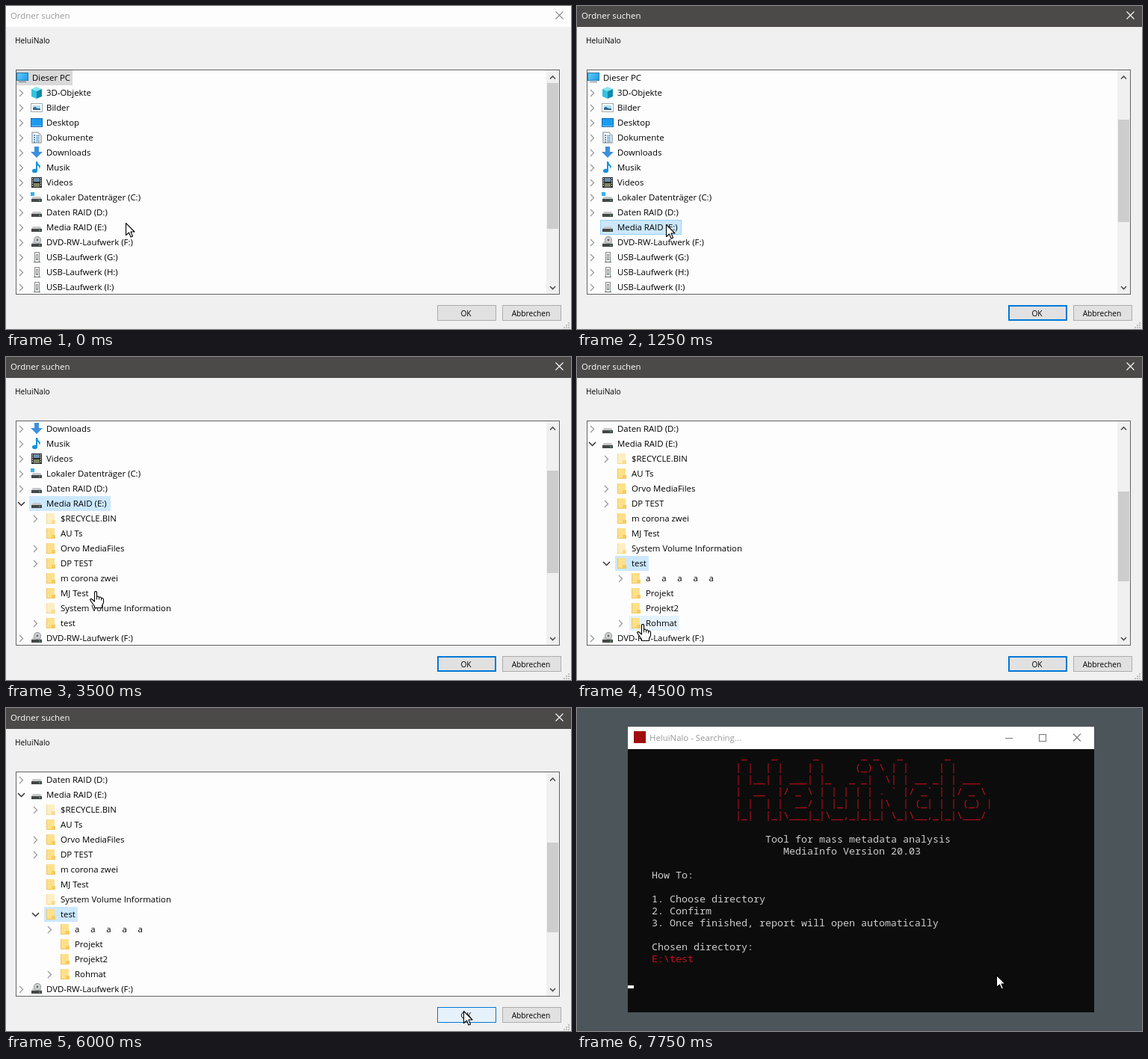
Animation, 756 px wide and 432 px high, one loop 8 s. Source, as an HTML page with a canvas:

```html
<!DOCTYPE html>
<html lang="de">
<head>
<meta charset="utf-8">
<title>HeluiNalo</title>
<style>
html, body { margin: 0; width: 100%; height: 100%; overflow: hidden; background: #f0f0f0; }
canvas { display: block; width: 756px; height: 432px; }
</style>
</head>
<body>
<canvas id="stage" width="756" height="432"></canvas>
<script>
const ctx = document.getElementById('stage').getContext('2d');
const LOOP = 8000;
const APP = 'HeluiNalo';
const UI = '11.4px "Open Sans", "Noto Sans", sans-serif';
const SMALL = '10.2px "Open Sans", "Noto Sans", sans-serif';
const MONO = '13.333px "Noto Sans Mono", "DejaVu Sans Mono", monospace';

// ---------- drawing helpers ----------
function box(x, y, w, h, fill) {
  ctx.fillStyle = fill;
  ctx.fillRect(x, y, w, h);
}
function frame(x, y, w, h, color, line = 1) {
  ctx.strokeStyle = color;
  ctx.lineWidth = line;
  ctx.strokeRect(x + line / 2, y + line / 2, w - line, h - line);
}
function path(points, close) {
  ctx.beginPath();
  for (let i = 0; i < points.length; i += 2) ctx.lineTo(points[i], points[i + 1]);
  if (close) ctx.closePath();
}
function poly(points, fill, stroke) {
  path(points, true);
  ctx.fillStyle = fill;
  ctx.fill();
  if (stroke) { ctx.strokeStyle = stroke; ctx.lineWidth = 1.1; ctx.stroke(); }
}
function line(points, color, width = 1) {
  path(points, false);
  ctx.strokeStyle = color;
  ctx.lineWidth = width;
  ctx.stroke();
}
function disc(x, y, rx, ry, fill) {
  ctx.beginPath();
  ctx.ellipse(x, y, rx, ry, 0, 0, 7);
  ctx.fillStyle = fill;
  ctx.fill();
}
function text(str, x, y, color = '#000', font = UI, align = 'left') {
  ctx.font = font;
  ctx.fillStyle = color;
  ctx.textAlign = align;
  ctx.fillText(str, x, y);
}
function cross(x, y, color) {
  line([x - 5, y - 5, x + 5, y + 5], color, 1.1);
  line([x + 5, y - 5, x - 5, y + 5], color, 1.1);
}

// ---------- icons, each in a 16 by 16 cell ----------
function drive() {
  poly([3, 7, 13, 7, 15, 10, 1, 10], '#c6c8ca');
  box(1, 10, 14, 4, '#444648');
  box(11, 11.5, 2, 1, '#4fd66a');
}
const icons = {
  pc() {
    box(0, 1, 16, 11, '#2878a8');
    const g = ctx.createLinearGradient(0, 2, 16, 11);
    g.addColorStop(0, '#66cdf8');
    g.addColorStop(1, '#1d9be6');
    box(1, 2, 14, 9, g);
    box(3, 13, 10, 1, '#5d7d90');
  },
  cube() {
    poly([8, 0, 15, 3, 8, 6, 1, 3], '#8ce4f2');
    poly([1, 3, 8, 6, 8, 16, 1, 13], '#35c3dc');
    poly([15, 3, 8, 6, 8, 16, 15, 13], '#0d8cae');
  },
  picture() {
    box(0, 2, 16, 12, '#a4a9ac');
    box(1, 3, 14, 10, '#fff');
    box(3, 5, 10, 6, '#a9dcf8');
    poly([3, 11, 3, 8, 6, 7, 9, 9, 13, 9, 13, 11], '#2d688e');
  },
  desktop() {
    box(0, 2, 16, 12, '#1468b0');
    box(1, 3, 14, 9, '#1c9cf0');
    box(1, 12, 14, 1, '#75c5f6');
  },
  page() {
    poly([2, 1, 10, 1, 14, 5, 14, 15, 2, 15], '#fff', '#80878c');
    poly([10, 1, 10, 5, 14, 5], '#d4dade');
    for (let y = 4; y < 14; y += 2) box(7, y + 1, 5, 1, '#4b8fbd');
    for (let y = 4; y < 14; y += 3) box(4, y, 2, 2, '#4b8fbd');
  },
  down() {
    poly([5, 0, 11, 0, 11, 7, 16, 7, 8, 15, 0, 7, 5, 7], '#3d8fdd');
  },
  music() {
    disc(5.5, 12.5, 3.5, 2.8, '#1592dc');
    box(7, 0, 2, 13, '#1592dc');
    poly([9, 0, 10, 3, 13, 6, 12, 10, 11, 7, 9, 5], '#1592dc');
  },
  film() {
    box(1, 1, 14, 14, '#2b2b2d');
    for (let y = 2; y < 14; y += 3) {
      box(2, y, 1, 2, '#ddd');
      box(13, y, 1, 2, '#ddd');
    }
    box(4, 2, 8, 5, '#6a8fae');
    box(4, 9, 8, 5, '#7c8760');
  },
  system() {
    drive();
    box(0, 1, 5, 5, '#35b0ee');
  },
  drive,
  dvd() {
    drive();
    disc(9, 5, 5, 5, '#8e9296');
    disc(9, 5, 4, 4, '#cfd2d4');
    disc(9, 5, 1.4, 1.4, '#666');
  },
  usb() {
    box(5, 1, 7, 14, '#85888a');
    box(6, 2, 5, 12, '#f6f6f6');
    box(7, 4, 3, 8, '#8d9092');
    box(8, 5, 1, 5, '#eee');
    box(8, 11, 1, 1, '#3fc45b');
    box(4, 14, 9, 1, '#696c6e');
  },
  folder() {
    box(2, 1, 11, 14, '#ffe08a');
    box(2, 1, 1, 14, '#edc765');
    box(2, 14, 11, 1, '#eec663');
    poly([9, 10, 14, 10, 14, 15, 9, 15], '#f6cb5f');
  },
  hidden() {
    ctx.globalAlpha = 0.5;
    icons.folder();
    ctx.globalAlpha = 1;
  }
};

// ---------- folder tree: level, icon, label, chevron ----------
const head = [
  [0, 'pc', 'Dieser PC', ''],
  [1, 'cube', '3D-Objekte', '>'],
  [1, 'picture', 'Bilder', '>'],
  [1, 'desktop', 'Desktop', '>'],
  [1, 'page', 'Dokumente', '>'],
  [1, 'down', 'Downloads', '>'],
  [1, 'music', 'Musik', '>'],
  [1, 'film', 'Videos', '>'],
  [1, 'system', 'Lokaler Datenträger (C:)', '>'],
  [1, 'drive', 'Daten RAID (D:)', '>']
];
const tail = [
  [1, 'dvd', 'DVD-RW-Laufwerk (F:)', '>'],
  ...['G', 'H', 'I'].map(c => [1, 'usb', `USB-Laufwerk (${c}:)`, '>'])
];
const media = chevron => [1, 'drive', 'Media RAID (E:)', chevron];
const folders = chevron => [
  [2, 'hidden', '$RECYCLE.BIN', '>'],
  [2, 'folder', 'AU Ts', ''],
  [2, 'folder', 'Orvo MediaFiles', '>'],
  [2, 'folder', 'DP TEST', '>'],
  [2, 'folder', 'm corona zwei', ''],
  [2, 'folder', 'MJ Test', ''],
  [2, 'hidden', 'System Volume Information', ''],
  [2, 'folder', 'test', chevron]
];
const inner = [
  [3, 'folder', Array(5).fill('a').join('     '), '>'],
  [3, 'folder', 'Projekt', ''],
  [3, 'folder', 'Projekt2', ''],
  [3, 'folder', 'Rohmat', '>']
];

function treeAt(t) {
  if (t < 1500) return [...head, media(t < 250 ? '>' : ''), ...tail];
  if (t < 4500) return [...head, media(t < 3500 ? '' : 'v'), ...folders('>'), ...tail].slice(5);
  return [...head, media('v'), ...folders('v'), ...inner, ...tail].slice(9);
}

// Highlights as [left, right, row centre, fill, edge]
function marksAt(t) {
  const SEL = '#cce8ff', HOT = '#e5f3ff', EDGE = '#99d1ff';
  if (t < 1250) {
    const marks = [[14, 89, 96, '#d9d9d9']];
    if (t >= 250) marks.push([31, 140, 296, HOT]);
    return marks;
  }
  if (t < 1500) return [[31, 140, 296, SEL, EDGE]];
  if (t < 4500) {
    const marks = [[31, 140, 196, SEL]];
    if (t >= 3750) marks.push([51, 96, 356, HOT]);
    return marks;
  }
  const marks = [[51, 96, 276, SEL]];
  if (t < 5000) marks.push([70, 137, 356, HOT]);
  return marks;
}

function drawMark([left, right, y, fill, edge]) {
  box(left, y - 10, right - left, 20, fill);
  if (edge) frame(left, y - 10, right - left, 20, edge);
}

function drawRow([level, icon, label, chevron], y) {
  const shift = 19 * (level - 1);
  const x = level ? 33 + shift : 14;
  const c = 20 + shift;
  if (chevron === '>') line([c - 2, y - 4, c + 2.5, y + 0.5, c - 2, y + 5], '#9a9a9a', 1.3);
  if (chevron === 'v') line([c - 4, y - 2, c + 0.5, y + 2.5, c + 5, y - 2], '#333', 1.5);
  ctx.save();
  ctx.translate(x, y - 8);
  icons[icon]();
  ctx.restore();
  text(label, x + 21, y + 4);
}

function drawTree(t) {
  box(13, 85, 728, 301, '#fdfdfd');
  ctx.save();
  ctx.beginPath();
  ctx.rect(14, 86, 709, 299);
  ctx.clip();
  marksAt(t).forEach(drawMark);
  treeAt(t).slice(0, 15).forEach((row, i) => drawRow(row, 96 + 20 * i));
  ctx.restore();

  const [top, bottom] = t < 1250 ? [103, 298] : t < 4500 ? [152, 289] : [180, 300];
  box(723, 86, 17, 299, '#f0f0f0');
  box(724, top, 15, bottom - top, '#cdcdcd');
  line([728, 97.5, 731.5, 94, 735, 97.5], '#505050', 1.6);
  line([728, 375, 731.5, 378.5, 735, 375], '#505050', 1.6);
  frame(13, 85, 728, 301, '#646464');
}

function button(x, label, fill, edge, width) {
  box(x, 400, 79, 21, fill);
  frame(x, 400, 79, 21, edge, width);
  text(label, x + 38.5, 415, '#000', SMALL, 'center');
}

function drawDialog(t) {
  const active = t >= 1250, hover = t >= 5500;
  box(0, 0, 756, 432, '#f0f0f0');
  box(0, 0, 756, 28, active ? '#4c4a48' : '#fdfdfd');
  text('Ordner suchen', 6, 17, active ? '#fff' : '#999');
  cross(740.5, 12.5, active ? '#fff' : '#8a8a8a');
  text(APP, 12, 50, '#000', SMALL);
  drawTree(t);
  button(577, 'OK', hover ? '#e5f1fb' : '#e1e1e1', active ? '#0078d7' : '#adadad', active && !hover ? 2 : 1);
  button(664, 'Abbrechen', '#e1e1e1', '#adadad', 1);
  for (let i = 0; i < 3; i++)
    for (let j = 2 - i; j < 3; j++) box(746 + 3 * j, 423 + 3 * i, 2, 2, '#bfbfbf');
}

// ---------- console ----------
const banner = [
  ' _    _      _       _ _   _       _',
  '| |  | |    | |     (_) \\ | |     | |',
  '| |__| | ___| |_   _ _|  \\| | __ _| | ___',
  '|  __  |/ _ \\ | | | | | . ` |/ _` | |/ _ \\',
  '| |  | |  __/ | |_| | | |\\  | (_| | | (_) |',
  '|_|  |_|\\___|_|\\__,_|_|_| \\_|\\__,_|_|\\___/'
];

function put(str, col, row, color = '#ccc') {
  text(str, 68 + 8 * col, 68 + 16 * row, color, MONO);
}

function drawConsole(t) {
  const RED = '#c50f1f', GREY = '#777';
  const busy = t >= 7250;
  box(0, 0, 756, 432, '#4c555a');
  box(68, 25, 624, 30, '#fff');
  box(68, 55, 624, 352, '#0c0c0c');
  box(76, 31, 16, 16, '#a00c10');
  text(APP + (busy ? ' - Searching...' : ''), 97, 44, '#999');
  line([573, 40.5, 583, 40.5], GREY);
  frame(618, 35, 10, 10, GREY);
  cross(669, 39.5, GREY);

  banner.forEach((str, i) => put(str, 18, i, RED));
  put('Tool for mass metadata analysis', 23, 7);
  put('MediaInfo Version 20.03', 26, 8);
  put('How To:', 4, 10);
  put('1. Choose directory', 4, 12);
  put('2. Confirm', 4, 13);
  put('3. Once finished, report will open automatically', 4, 14);
  if (busy) {
    put('Chosen directory:', 4, 16);
    put('E:\\test', 4, 17, RED);
    box(68, 371, 8, 4, '#fff');
  }
}

// ---------- mouse pointer: start time, x, y, hand ----------
const pointer = [
  [0, 160, 290, 0], [250, 133, 297, 1], [500, 119, 292, 1], [1250, 119, 292, 0],
  [3500, 119, 313, 1], [3750, 79, 352, 1], [4000, 87, 357, 1], [4750, 101, 358, 1],
  [5000, 273, 359, 0], [5250, 506, 394, 0], [5500, 591, 400, 0], [5750, 611, 402, 0],
  [6000, 612, 405, 0], [7750, 561, 357, 0]
];

function drawPointer(t) {
  const [, x, y, hand] = pointer.filter(p => p[0] <= t).pop();
  ctx.save();
  ctx.translate(x + 0.5, y + 0.5);
  ctx.lineJoin = 'round';
  if (hand) {
    poly([-1, 1, 0, 0, 1, 0, 2, 1, 2, 7, 4, 6.5, 5, 8, 7, 7.5, 8, 9, 10, 9, 11, 11,
      11, 15, 9, 19, 9, 22, -1, 22, -1, 20, -6, 13, -7, 10.5, -5, 10, -1, 13.5], '#fff', '#000');
    line([2, 7, 2, 11], '#000');
    line([5, 8, 5, 11], '#000');
    line([8, 9, 8, 12], '#000');
  } else {
    poly([0, 0, 0, 16, 4, 12.5, 6.5, 18.5, 9, 17.5, 6.5, 11.5, 11.5, 11.5], '#fff', '#000');
  }
  ctx.restore();
}

function draw(now) {
  const t = now % LOOP;
  if (t < 7000) drawDialog(t);
  else drawConsole(t);
  drawPointer(t);
}

const start = performance.now();
function tick() {
  draw(performance.now() - start);
  requestAnimationFrame(tick);
}
tick();
</script>
</body>
</html>
```
